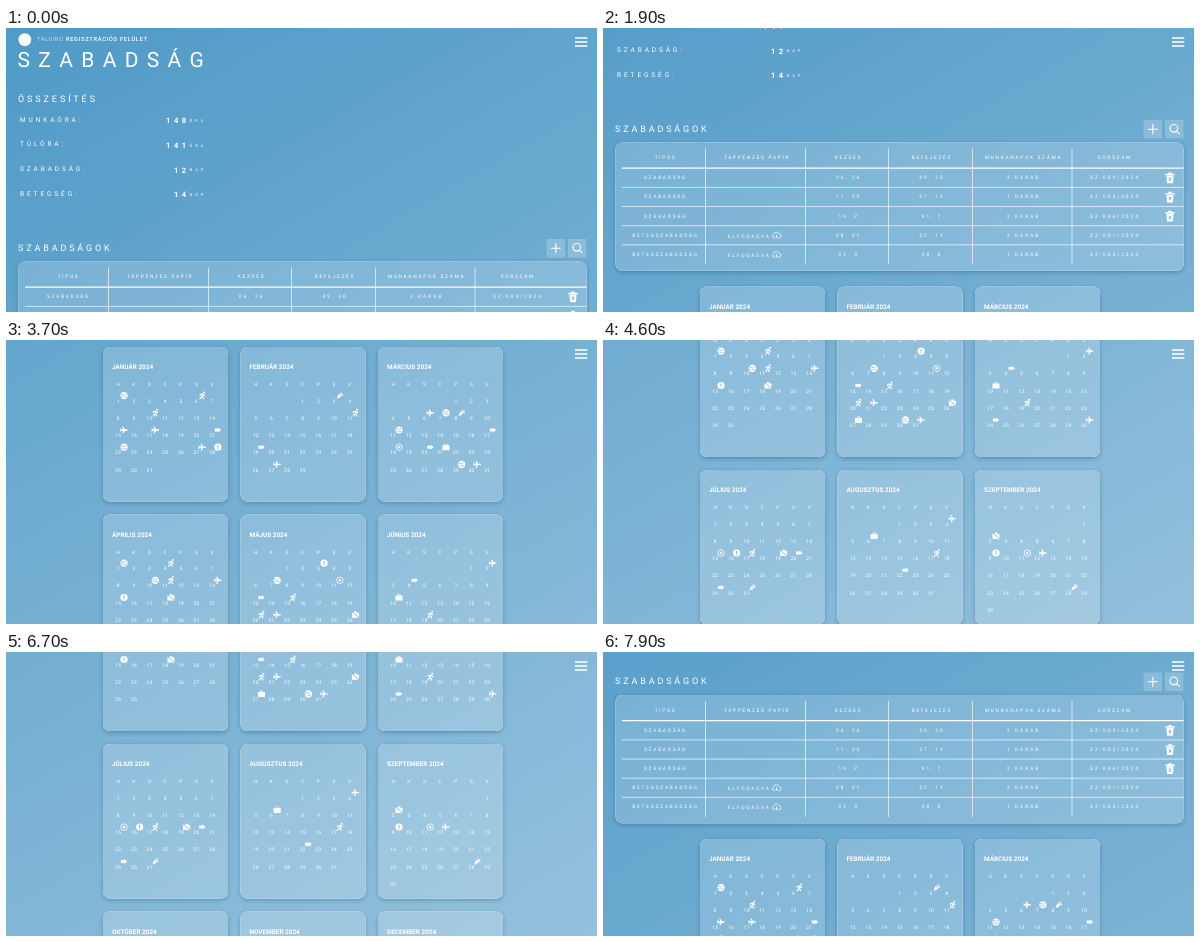
An HTML page for the animation above (8 s loop, 591 by 284 pixels).

```html
<!DOCTYPE html>
<html lang="hu">
<head>
<meta charset="utf-8">
<title>Szabadság</title>
<style>
html, body { margin: 0; width: 100%; height: 100%; overflow: hidden; background: #5fa4cd; }
svg { display: block; width: 100vw; height: 100vh; }
text { fill: #fff; font-family: Roboto, Inter, "Liberation Sans", sans-serif; text-rendering: geometricPrecision; }
</style>
</head>
<body>
<svg id="stage" viewBox="0 0 591 284" preserveAspectRatio="none">
  <defs>
    <linearGradient id="sky" gradientUnits="userSpaceOnUse" x1="-16" y1="9" x2="607" y2="1087">
      <stop offset="0" stop-color="#4f9ac7"/>
      <stop offset="1" stop-color="#a0c7e0"/>
    </linearGradient>
    <filter id="shadow" x="-10%" y="-10%" width="120%" height="125%">
      <feDropShadow dx="0" dy="1.6" stdDeviation="2" flood-color="#0c3350" flood-opacity=".3"/>
      <feComposite in2="SourceAlpha" operator="out"/>
    </filter>
  </defs>
  <g id="page"></g>
  <path d="M569 10h12.3M569 14h12.3M569 18h12.3" stroke="#fff" stroke-width="1.3"/>
</svg>
<script>
const NS = 'http://www.w3.org/2000/svg';
const page = document.getElementById('page');
const INK = '#6ba5c9';
const LOOP = 8000, STEP = 100;

function add(tag, attrs, parent = page) {
  const el = document.createElementNS(NS, tag);
  for (const k in attrs) el.setAttribute(k, attrs[k]);
  parent.appendChild(el);
  return el;
}

// cy is the vertical centre of the capitals
function label(str, x, cy, size, { ls = 0, weight = 400, anchor = 'start' } = {}) {
  const shift = anchor === 'middle' ? ls / 2 : anchor === 'end' ? ls : 0;
  const el = add('text', {
    x: x + shift, y: cy + size * 0.356, 'font-size': size, 'font-weight': weight,
    'letter-spacing': ls, 'text-anchor': anchor
  });
  el.textContent = str;
  return el;
}

function line(d, width, opacity = 0.9) {
  add('path', { d, stroke: '#fff', 'stroke-width': width, 'stroke-opacity': opacity, fill: 'none' });
}

function card(x, y, width, height) {
  const box = { x, y, width, height, rx: 7 };
  add('rect', { ...box, fill: '#fff', filter: 'url(#shadow)' });
  add('rect', { ...box, fill: '#fff', 'fill-opacity': 0.17 });
}

// Each icon: [path, fill, stroke, stroke width] layers around (0,0)
const W = '#fff', NO = 'none';
const disc = 'M-3.6 0a3.6 3.6 0 1 0 7.2 0a3.6 3.6 0 1 0 -7.2 0';
const bag = 'M-3.5 -1.9h2v-1.4h3v1.4h2v5h-7z';
const icons = {
  S: [[disc, W], ['M-2.8 -1.6L.2 -.4M1 -1.2l1.2 -.5M-.6 1.8q1.3 -1.4 2.8 -.2M-3 .8l1.5 .5', NO, INK, 0.7]],
  K: [['M.9 -3a1 1 0 1 0 2 0a1 1 0 1 0 -2 0', W],
      ['M1 -1.5L-.4 1L1.3 2.2L.8 3.8M-.4 1L-2.6 3.6M1 -1.5L-1.6 -1.3L-2.4 .3M1 -1.3L2.7 .4', NO, W, 1.1]],
  A: [['M3.8 0q0 .7 -1 .7H1L-.8 3.6H-1.7L-.9 .7H-2.5L-3.3 1.7H-3.9L-3.5 0L-3.9 -1.7H-3.3L-2.5 -.7H-.9L-1.7 -3.6H-.8L1 -.7H2.8q1 0 1 .7z', W]],
  C: [['M-3.1 -1.4H.3V-2.5L3.3 0L.3 2.3V1.5H-3.1z', W]],
  E: [[disc, W], ['M0 -2.1V.5M0 1.2V2.1', NO, INK, 0.9]],
  F: [['M-3.2 0a3.2 3.2 0 1 0 6.4 0a3.2 3.2 0 1 0 -6.4 0', NO, W, 0.8],
      ['M-1.2 0a1.2 1.2 0 1 0 2.4 0a1.2 1.2 0 1 0 -2.4 0', W]],
  B: [[bag, W], ['M-.8 -1.9v-.7h1.6v.7', INK]],
  X: [[bag, W], ['M-3.6 -3.2L3.6 3.2', NO, INK, 0.9], ['M-3.9 -2.7L3.2 3.7', NO, W, 0.6]],
  P: [['M-3.2 3.4L-1.2 -1.5L1.5 1.2z', W],
      ['M-.2 -.7Q1.4 -1.6 .8 -3.1M.8 .4Q1.8 -.8 3.4 -.2M.7 -.2L2.9 -2.6', NO, W, 1]],
  trash: [['M-3.6 -2.4H3.6L2.9 5.4H-2.9z', W], ['M-4.6 -3.4H4.6M-1.7 -4.7H1.7', NO, W, 1.4],
          ['M-1.2 -.4L1.2 3M1.2 -.4L-1.2 3', NO, INK, 0.8]],
  cloud: [['M-1.6 2.9H-2.3A2 2 0 0 1 -2.8 -.9A2.8 2.8 0 0 1 2.6 -1.1A2 2 0 0 1 2.5 2.9H1.6', NO, W, 0.7],
          ['M0 -.6V2.6M-1.3 1.4L0 2.7L1.3 1.4', NO, W, 0.7]]
};

function icon(name, x, y) {
  const g = add('g', { transform: `translate(${x} ${y})` });
  for (const [d, fill, stroke = NO, width = 0] of icons[name])
    add('path', { d, fill, stroke, 'stroke-width': width }, g);
}

function drawSummary() {
  add('circle', { cx: 18.8, cy: 11.6, r: 6.4, fill: '#fff' });
  const head = label('', 31, 11.2, 5.7, { ls: 0.72 });
  add('tspan', { 'font-weight': 300 }, head).textContent = 'TALVIRO ';
  add('tspan', { 'font-weight': 500 }, head).textContent = 'REGISZTRÁCIÓS FELÜLET';
  label('SZABADSÁG', 11.5, 31.5, 21, { ls: 8.3 });
  label('ÖSSZESÍTÉS', 12, 71, 9, { ls: 2.9 });
  [['MUNKAÓRA:', '148', 'ÓRA'], ['TÚLÓRA:', '141', 'ÓRA'],
   ['SZABADSÁG:', '12', 'NAP'], ['BETEGSÉG:', '14', 'NAP']].forEach(([name, n, unit], i) => {
    const y = 91.2 + i * 24.75;
    label(name, 14, y, 6.5, { ls: 2.9 });
    label(n, 180, y + 1.3, 7.5, { ls: 3.5, weight: 700, anchor: 'end' });
    label(unit, 183.5, y + 1.3, 4, { ls: 2.9 });
  });
}

function drawTable() {
  label('SZABADSÁGOK', 12, 219.5, 9, { ls: 2.85 });
  for (const x of [540.5, 562]) add('rect', { x, y: 211, width: 18.5, height: 18.5, fill: '#fff', 'fill-opacity': 0.2 });
  line('M544.8 220.2h10M549.8 215.2v10', 1.1, 1);
  line('M567 219.3a3.8 3.8 0 1 0 7.6 0a3.8 3.8 0 1 0 -7.6 0M573.5 222.1l3 3', 1.1, 1);

  card(12.5, 233.5, 568, 128.2);
  const cols = [61.7, 153.2, 244.7, 328, 419.7, 511];
  ['TÍPUS', 'TÁPPÉNZES PAPÍR', 'KEZDÉS', 'BEFEJEZÉS', 'MUNKANAPOK SZÁMA', 'SORSZÁM']
    .forEach((t, i) => label(t, cols[i], 248.5, 4.8, { ls: 1.7, anchor: 'middle' }));
  line('M19 259.2H580.5', 1.3, 1);
  for (const x of [102.5, 202.5, 285.5, 369.5, 469]) line(`M${x} 239.5V355.5`, 0.8, 0.8);

  [['06. 26', '09. 30', 2, '009'], ['11. 30', '07. 14', 1, '003'], ['10. 2', '01. 7', 2, '006'],
   ['08. 31', '02. 13', 2, '001'], ['05. 4', '08. 8', 1, '003']].forEach(([from, to, days, id], i) => {
    const y = 268.6 + i * 19.15, sick = i > 2;
    const cell = (t, c, ls) => label(t, cols[c], y, 4.8, { ls, anchor: 'middle' });
    cell(sick ? 'BETEGSZABADSÁG' : 'SZABADSÁG', 0, 1.75);
    cell(from, 2, 2);
    cell(to, 3, 2);
    cell(days + ' DARAB', 4, 2);
    cell(`SZ-${id}/2024`, 5, 2);
    if (sick) {
      label('ELFOGADVA', 125, y + 0.8, 4.8, { ls: 1.75 });
      icon('cloud', 173.5, y + 0.2);
    } else icon('trash', 567, y + 0.3);
    if (i < 4) line(`M19 ${y + 9.8}H580.5`, 0.8, 0.8);
  });
}

// Day number followed by the icon letter
const months = [
  ['JANUÁR', '1S 6K 10K 15A 17A 21C 22S 27A 28E'],
  ['FEBRUÁR', '3P 11K 19C 27A'],
  ['MÁRCIUS', '6A 7S 8P 11S 17C 18F 20C 21B 29S 30A'],
  ['ÁPRILIS', '1S 4K 10S 11K 14A 15E 18X'],
  ['MÁJUS', '3E 7S 11F 13C 15K 20K 21A 26X 27B 30S 31A'],
  ['JÚNIUS', '2A 4C 10B 19K 24C 30A'],
  ['JÚLIUS', '15F 16E 17K 19X 20C 29C 31P'],
  ['AUGUSZTUS', '4A 6B 17K 22C'],
  ['SZEPTEMBER', '2X 9E 11F 12A 28P'],
  ['OKTÓBER', '1S 6X 19S 24C 25C 27A 28K'],
  ['NOVEMBER', '5B 9C 14C 17A 21F 23C 26K 28E'],
  ['DECEMBER', '7C 17K 19S 25S 30S 31E']
];

function drawMonth([name, marks], m) {
  const x = 97 + (m % 3) * 137.5, y = 377.5 + Math.floor(m / 3) * 167.5;
  const first = (new Date(2024, m, 1).getDay() + 6) % 7;
  const count = new Date(2024, m + 1, 0).getDate();
  const colX = c => x + 15.2 + c * 15.65;
  const place = day => {
    const n = first + day - 1;
    return [colX(n % 7), y + 54 + Math.floor(n / 7) * 17.2];
  };
  card(x, y, 125, 154.5);
  label(name + ' 2024', x + 9, y + 20.2, 6.4, { weight: 700 });
  [...'HKSCPSV'].forEach((d, c) => label(d, colX(c), y + 37.5, 4.7, { anchor: 'middle' }));
  for (let day = 1; day <= count; day++)
    label(day, ...place(day), 4.9, { ls: 0.3, anchor: 'middle' });
  for (const mark of marks.split(' ')) {
    const [dx, dy] = place(parseInt(mark));
    icon(mark.slice(-1), dx + 5.8, dy - 5.4);
  }
}

function drawLegend() {
  [['P', 80, 88, 'MUNKASZÜNETI NAP'], ['B', 74, 81.5, 'ÁTHELYEZETT MUNKANAP'],
   ['X', 62, 69.5, 'ÁTHELYEZETT MUNKASZÜNETI NAP'],
   ['K', 239, 246.5, 'KÖTELEZŐ SZABADNAP'], ['A', 253, 260.5, 'SZABADSÁG'],
   ['E', 237, 244.5, 'RENDKÍVÜLI SZABADSÁG'],
   ['S', 406.5, 414, 'BETEGSZABADSÁG'], ['C', 414, 421.5, 'CSÚSZTATÁS'],
   ['F', 391.8, 399, 'FIZETÉS NÉLKÜLI SZABADSÁG']].forEach(([kind, ix, tx, text], i) => {
    const y = 1053.8 + (i % 3) * 13.75;
    icon(kind, ix, y + 0.3);
    label('- ' + text, tx, y, 4.6, { ls: 0.58 });
  });
}

add('rect', { width: 591, height: 1110, fill: 'url(#sky)' });
drawSummary();
drawTable();
months.forEach(drawMonth);
drawLegend();

// Scroll position over time: [ms, px]
const track = [
  [0, 0], [1300, 0], [1900, 119], [2100, 140], [2300, 140], [2600, 175.5], [3200, 310], [3400, 310],
  [3700, 370.5], [4200, 500], [4300, 500], [4900, 665], [5000, 665], [5500, 812], [5600, 813],
  [6000, 813], [6400, 650], [6500, 650], [6700, 620.5], [7200, 410], [7300, 410], [7700, 200],
  [7800, 200], [7900, 190.5], [8000, 190.5]
];
const slope = i => i < 0 || i > track.length - 2 ? 0
  : (track[i + 1][1] - track[i][1]) / (track[i + 1][0] - track[i][0]);
const tangent = i => {
  const a = slope(i - 1), b = slope(i);
  return a * b > 0 ? 2 * a * b / (a + b) : 0;
};

function scrollAt(t) {
  let i = 0;
  while (i < track.length - 2 && t >= track[i + 1][0]) i++;
  const [t0, y0] = track[i], [t1, y1] = track[i + 1];
  const h = t1 - t0, u = (t - t0) / h, v = 1 - u;
  return y0 * v * v * (1 + 2 * u) + y1 * u * u * (3 - 2 * u)
    + h * u * v * (tangent(i) * v - tangent(i + 1) * u);
}

function render(ms) {
  const t = Math.floor((ms % LOOP) / STEP) * STEP;
  page.setAttribute('transform', `translate(0 ${-scrollAt(t).toFixed(2)})`);
}

const start = performance.now();
function tick() {
  render(performance.now() - start);
  requestAnimationFrame(tick);
}
tick();
</script>
</body>
</html>
```
